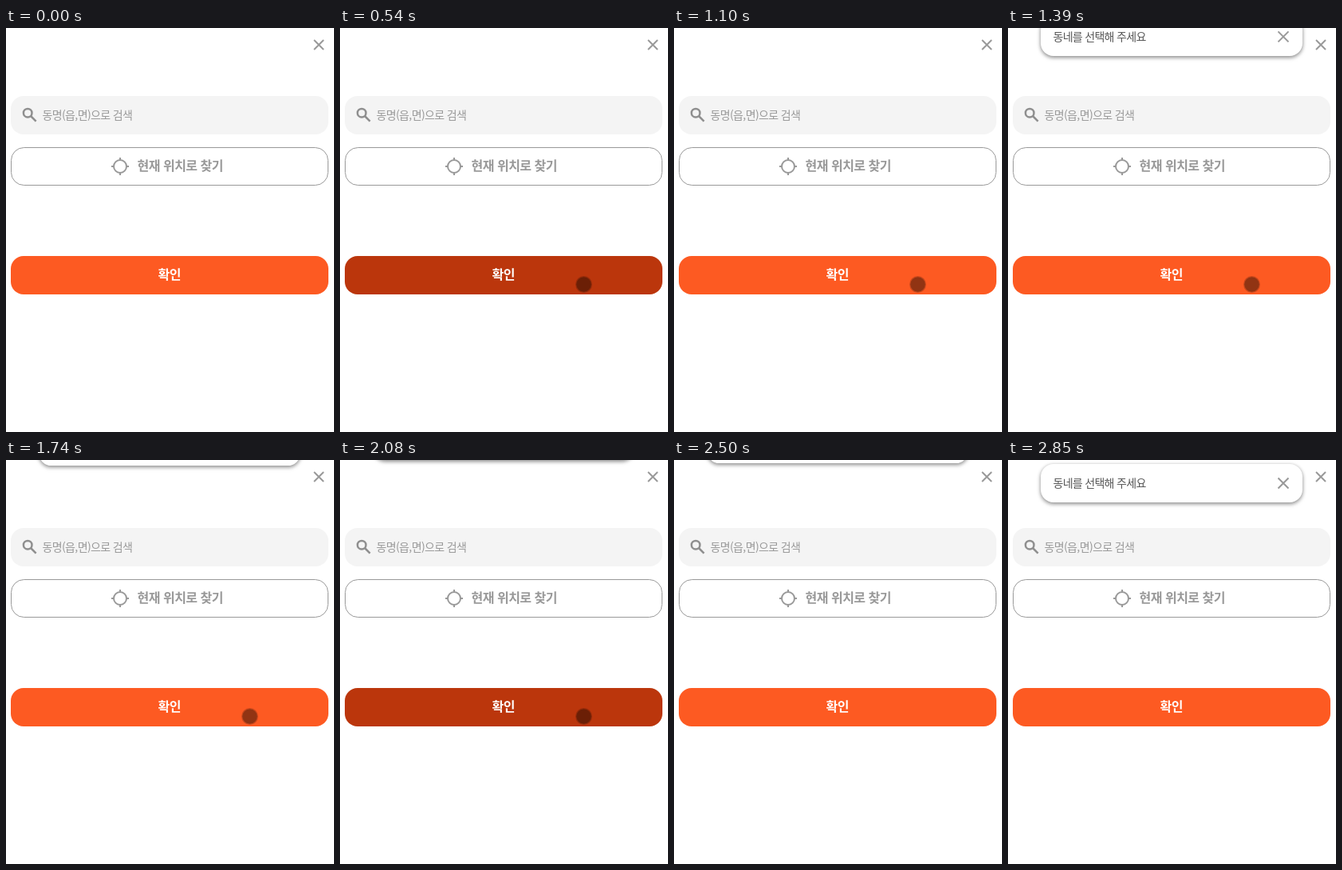
Animation of 411 by 505 pixels, one loop 2.92 s. Source, as an HTML page:

```html
<!DOCTYPE html>
<html lang="ko">
<head>
<meta charset="utf-8">
<title>동네 검색</title>
<style>
  html, body { margin: 0; width: 100%; height: 100%; overflow: hidden; background: #fff; }
  svg { display: block; width: 411px; height: 505px; }
  text { font-family: "Noto Sans CJK KR", "Noto Sans CJK", "Noto Sans KR", sans-serif; }
  .icon { fill: none; stroke: #999; stroke-width: 2; }
  .bold { font-size: 16px; font-weight: 600; letter-spacing: -.5px; }
  .small { font-size: 14px; }
  .card { filter: drop-shadow(0 2px 2.5px rgba(0,0,0,.32)) drop-shadow(0 1px 2px rgba(0,0,0,.2)); }
</style>
</head>
<body>
<svg viewBox="0 0 411 505" xmlns="http://www.w3.org/2000/svg">
  <rect width="411" height="505" fill="#fff"/>
  <path class="icon" d="M386 15l12 12m0-12l-12 12"/>

  <rect x="6" y="85" width="398" height="48" rx="16" fill="#f4f4f4"/>
  <g class="icon" style="stroke: #8f8f8f; stroke-width: 2.5">
    <circle cx="27.2" cy="106.2" r="5.3"/>
    <path d="M31 110l6.6 6.6"/>
  </g>
  <text class="small" x="45.5" y="114" fill="#999" letter-spacing="-.63">동명(읍,면)으로 검색</text>

  <rect x="6.5" y="149.5" width="397" height="47" rx="16" fill="#fff" stroke="#999"/>
  <g class="icon">
    <circle cx="143" cy="173" r="8"/>
    <path d="M143 162v3.5m0 15v3.5M132 173h3.5m15 0h3.5"/>
  </g>
  <text class="bold" x="164.5" y="178" fill="#999">현재 위치로 찾기</text>

  <rect id="button" x="6" y="285" width="398" height="48" rx="16"/>
  <text class="bold" x="190.5" y="314" fill="#fff">확인</text>

  <g id="toast">
    <rect class="card" x="41" y="0" width="328" height="48" rx="16" fill="#fff"/>
    <text class="small" x="56.5" y="29" fill="#555" letter-spacing="-.7">동네를 선택해 주세요</text>
    <path class="icon" d="M338.5 17.5l13 13m0-13l-13 13"/>
  </g>

  <g id="cursor">
    <circle r="10.5" fill="#000" fill-opacity=".2"/>
    <circle r="9.3" fill="#000" fill-opacity=".28"/>
  </g>
</svg>
<script>
  const LOOP = 2920;
  const SLIDE = 500;
  const HIDDEN_Y = -58, SHOWN_Y = 5;

  // each tap: press time, release time
  const taps = [[340, 530], [915, 1057], [1400, 1559], [1760, 1954], [2030, 2347]];

  // pointer path: time, x, y
  const path = [[68, 375, 476], [136, 316, 350], [204, 305, 320],
                [2300, 305, 320], [2360, 319, 370], [2430, 362, 491]];

  const button = document.getElementById("button");
  const toast = document.getElementById("toast");
  const cursor = document.getElementById("cursor");

  const smooth = x => x * x * (3 - 2 * x);
  const show = (el, on) => el.setAttribute("visibility", on ? "visible" : "hidden");
  const move = (el, x, y) => el.setAttribute("transform", `translate(${x} ${y})`);

  const tick = t => t < 680
    ? Math.floor(t / 68) * 68
    : 680 + Math.floor((t - 680) / 70) * 70;

  function pointerAt(t) {
    const i = path.findIndex(p => p[0] >= t);
    if (i < 0 || t < path[0][0]) return null;
    if (i === 0) return path[0].slice(1);
    const [t0, x0, y0] = path[i - 1], [t1, x1, y1] = path[i];
    const k = (t - t0) / (t1 - t0);
    return [x0 + (x1 - x0) * k, y0 + (y1 - y0) * k];
  }

  function draw(time) {
    const t = tick(time);

    const pressed = taps.some(([down, up]) => t >= down && t < up);
    button.setAttribute("fill", pressed ? "#bb360c" : "#fd5a22");

    // every release restarts the slide
    const starts = taps.map(tap => tap[1]).filter(up => up <= t);
    const k = starts.length ? Math.min(1, (t - starts[starts.length - 1]) / SLIDE) : 0;
    const y = HIDDEN_Y + (SHOWN_Y - HIDDEN_Y) * smooth(k);
    show(toast, y > -52);
    move(toast, 0, y);

    const pos = pointerAt(t);
    show(cursor, pos);
    if (pos) move(cursor, pos[0] + .5, pos[1] + .5);
  }

  function loop() {
    draw(performance.now() % LOOP);
    requestAnimationFrame(loop);
  }
  loop();
</script>
</body>
</html>
```
